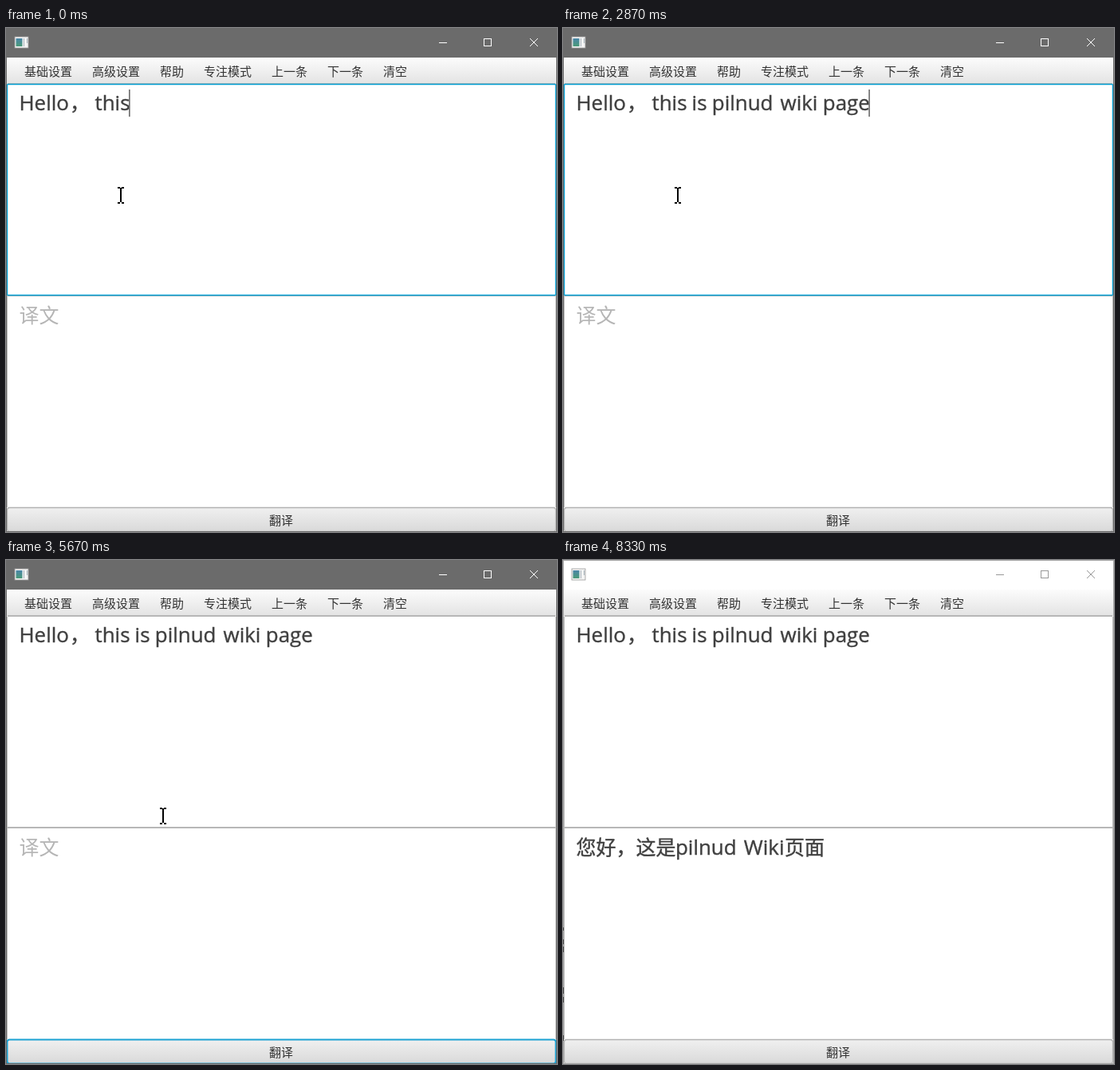
Animation, 691 px wide and 631 px high, one loop 8470 ms. Source, as an HTML page:

```html
<!DOCTYPE html>
<html lang="zh-CN">
<head>
<meta charset="utf-8">
<style>
html, body { margin: 0; width: 100%; height: 100%; overflow: hidden; background: #fff; }
svg { display: block; }
text { font: 15px "Open Sans", "Noto Sans CJK SC", "Noto Sans CJK", sans-serif; fill: #333; white-space: pre; }
.big { font-size: 25.9px; fill: #404040; stroke: #404040; stroke-width: .4px; }
.cjk { font-size: 25px; }
.line { fill: none; shape-rendering: crispEdges; }
</style>
</head>
<body>
<svg width="691" height="631" viewBox="0 0 691 631">
  <defs>
    <linearGradient id="bar" x2="0" y2="1"><stop stop-color="#fcfcfc"/><stop offset="1" stop-color="#e3e3e3"/></linearGradient>
    <linearGradient id="normal" x2="0" y2="1"><stop stop-color="#f0f0f0"/><stop offset="1" stop-color="#d9d9d9"/></linearGradient>
    <linearGradient id="hover" x2="0" y2="1"><stop stop-color="#f9f9f9"/><stop offset="1" stop-color="#e4e4e4"/></linearGradient>
    <linearGradient id="pressed" x2="0" y2="1"><stop stop-color="#dadada"/><stop offset="1" stop-color="#c8c8c8"/></linearGradient>
    <linearGradient id="teal" x2="0" y2="1"><stop stop-color="#4b86a8"/><stop offset="1" stop-color="#4a9a78"/></linearGradient>
    <clipPath id="typed"><rect id="reveal" y="70" height="60"/></clipPath>
  </defs>

  <rect width="691" height="631" fill="#fff"/>
  <rect id="title" width="691" height="37"/>
  <rect x="11" y="11" width="17" height="14" fill="#f4f4f4" stroke="#9a9a9a" stroke-width=".8"/>
  <rect x="12.5" y="13" width="8" height="10" fill="url(#teal)"/>
  <path d="M22.5 13V23M26.5 13V19" stroke="#a8b4bc"/>
  <g id="controls" fill="none">
    <path class="line" d="M543 18.5H553M599.5 13.5H608.5V22.5H599.5Z"/>
    <path d="M657 13L667 23M667 13L657 23"/>
  </g>

  <rect x="1" y="37" width="689" height="33" fill="url(#bar)"/>
  <g id="menu"></g>

  <path class="line" d="M1.5 71V600M689.5 71V600" stroke="#b9b9b9"/>
  <path class="line" d="M2 70H689M2 335H689" stroke="#b7b7b7" stroke-width="2"/>
  <rect id="focus" x="1.5" y="70.5" width="688" height="264" rx="1" fill="none" stroke="#039ed3" stroke-width="1.5"/>

  <text class="big" id="input" y="103" clip-path="url(#typed)"><tspan x="16.5">Hello</tspan><tspan class="cjk" x="80">，</tspan><tspan> </tspan><tspan x="111.6">this </tspan><tspan x="161.6">is </tspan><tspan x="186.8">pilnud </tspan><tspan x="272.5">wiki </tspan><tspan x="325.8">page</tspan></text>
  <rect id="caret" y="77" width="1.6" height="34" fill="#6a6a6a"/>

  <text class="cjk" id="hint" x="16.5" y="369" style="fill:#b5b5b5">译文</text>
  <text class="big" id="result" y="368.5"><tspan class="cjk" x="16.5">您好，这是</tspan><tspan x="141">pilnud </tspan><tspan x="226.8">Wiki</tspan><tspan class="cjk" x="278">页面</tspan></text>

  <rect id="button" x="1.5" y="600.5" width="688" height="30" rx="3"/>
  <text x="330" y="621.5">翻译</text>
  <path id="frame" class="line" d="M.5 .5H690.5V630.5H.5Z"/>
  <path id="behind" class="line" d="M.5 460V464M.5 475V481M.5 484V491M.5 535V543M.5 547V554M.5 595V602" stroke="#444"/>

  <path id="beam" class="line" d="M-4 -9.5H-1M1 -9.5H4M-4 9.5H-1M1 9.5H4M0 -9V9" stroke="#000" stroke-width="2"/>
  <path id="arrow" d="M.5 .5V19.5L5 15.3L8.2 22.5L11.6 21L8.4 14H14.2Z" fill="#fff" stroke="#000"/>
</svg>
<script>
const LOOP = 8470, STEP = 200 / 3;
const $ = id => document.getElementById(id);
const set = (id, attrs) => { for (const k in attrs) $(id).setAttribute(k, attrs[k]); };
const show = (id, on) => set(id, { visibility: on ? 'visible' : 'hidden' });
const within = (t, a, b) => t >= a && t < b;

const items = { 基础设置: 23, 高级设置: 108, 帮助: 193, 专注模式: 248, 上一条: 333, 下一条: 403, 清空: 473 };
$('menu').innerHTML = Object.entries(items).map(([s, x]) => `<text x="${x}" y="59.5">${s}</text>`).join('');

// The first 11 characters are there at the start; one key time for each of the rest
const keys = [200, 330, 530, 665, 730, 800, 930, 1000, 1130, 1200, 2000, 2130, 2130,
  2330, 2465, 2530, 2665, 2730, 2865, 2865];

// Pointer path: time, x, y
const path = [[0, 144, 209], [3330, 144, 209], [3730, 296, 608], [3865, 297, 609], [4065, 300, 608],
  [4600, 300, 608], [5465, 225, 374], [5665, 197, 320], [5730, 195, 308], [6200, 168, 368],
  [6330, 168, 368], [6465, 160, 375], [6600, 188, 372], [6900, 300, 345], [7200, 416, 259],
  [7330, 420, 208], [7730, 385, 660], [LOOP, 385, 660]];

function pointer(t) {
  const i = path.findIndex(p => p[0] > t), [t0, x0, y0] = path[i - 1], [t1, x1, y1] = path[i];
  const k = (t - t0) / (t1 - t0);
  return [x0 + (x1 - x0) * k, y0 + (y1 - y0) * k].map(Math.round);
}

function draw(now) {
  const t = Math.floor((now % LOOP + 4) / STEP) * STEP;
  const typing = t < 3999, active = t < 8330, done = t >= 5930;

  const count = 11 + keys.filter(k => k <= t).length;
  const end = $('input').getEndPositionOfChar(count - 1).x;
  set('reveal', { width: count < 31 ? end : 691 });
  set('caret', { x: end - 1.5 });
  show('caret', typing && !within(t, 1665, 1999) && !within(t, 3399, 3865));
  show('hint', !done);
  show('result', done);

  set('title', { fill: active ? '#6b6b6b' : '#fff' });
  set('controls', { stroke: active ? '#fff' : '#999' });
  set('frame', { stroke: active ? '#6b6b6b' : '#a8a8a8' });
  show('focus', typing);
  show('behind', !active);

  const [x, y] = pointer(t), onButton = y > 600;
  const over = onButton && y < 631 && t > 3860;
  const face = within(t, 3999, 4065) ? 'pressed' : over ? 'hover' : 'normal';
  const focused = !typing && active;
  set('button', { fill: `url(#${face})`, stroke: focused ? '#1ba2d3' : '#b2b2b2', 'stroke-width': focused ? 2 : 1.3 });
  for (const id of ['beam', 'arrow']) set(id, { transform: `translate(${x} ${y})` });
  show('beam', !onButton);
  show('arrow', onButton);
}

const start = performance.now();
(function tick() {
  draw(performance.now() - start);
  requestAnimationFrame(tick);
})();
</script>
</body>
</html>
```
